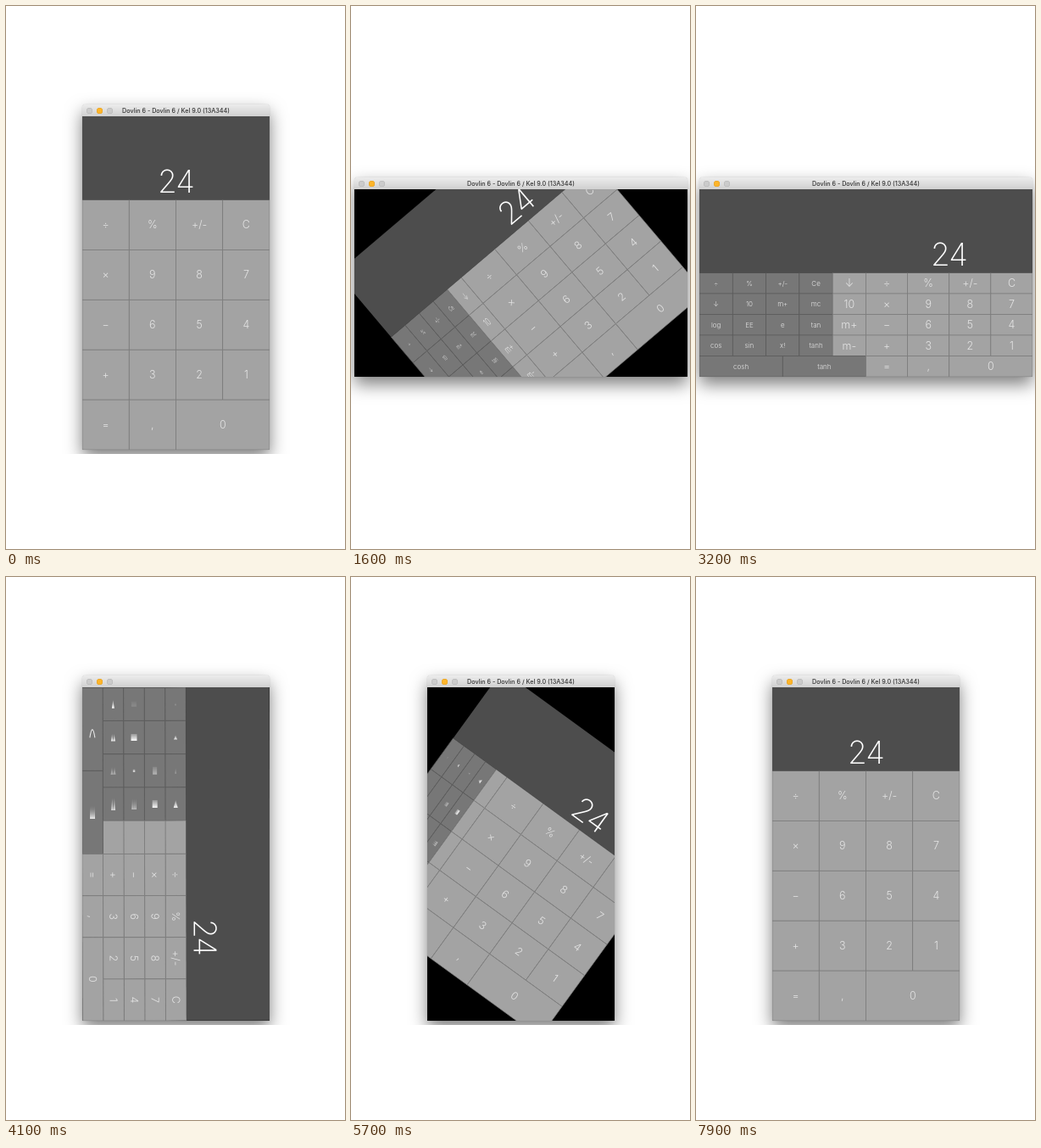
Animation of 400x640 px, one loop 8000 ms. Source, as an HTML page:

```html
<!DOCTYPE html>
<html lang="en">
<head>
<meta charset="utf-8">
<title>Rotating calculator</title>
<style>
/* --p: layout progress, 0 = portrait, 1 = landscape. --d: device orientation. */
@property --p { syntax: "<number>"; inherits: true; initial-value: 0; }
@property --d { syntax: "<number>"; inherits: true; initial-value: 0; }

html, body { margin: 0; width: 100%; height: 100%; overflow: hidden; background: #fff; }

#stage {
  position: absolute; left: 0; top: 0; width: 400px; height: 528px;
  overflow: hidden;
  font-family: Inter, Roboto, "Liberation Sans", sans-serif;
  animation: layout 8s infinite, device 8s step-end infinite;
}
@keyframes layout {
  0%, .125% { --p: 0; animation-timing-function: ease-in-out; }
  37.625% { --p: 1; }
  50.3125% { --p: 1; animation-timing-function: ease-in-out; }
  87.8125%, 100% { --p: 0; }
}
@keyframes device {
  0% { --d: 0; }
  1.1875% { --d: 1; }
  51.1875%, 100% { --d: 0; }
}

#window {
  position: absolute;
  left: calc(90px - 86px * var(--d));
  top: calc(116px + 86px * var(--d));
  width: calc(221px + 172px * var(--d));
  height: calc(407px - 172px * var(--d));
  border-radius: 4px 4px 1px 1px;
  box-shadow: 0 9px 20px rgba(0, 0, 0, .5), 0 0 1px rgba(0, 0, 0, .35);
}
#bar {
  position: relative; height: 14px;
  border-radius: 4px 4px 0 0;
  background: linear-gradient(#ececec, #d0d0d0);
}
#bar i {
  position: absolute; top: 4px; width: 7px; height: 7px;
  border-radius: 50%; background: #cbcbcb;
  box-shadow: inset 0 0 0 .5px #b4b4b4;
}
#bar i:nth-child(1) { left: 5px; }
#bar i:nth-child(2) { left: 16.5px; background: #fdb52a; box-shadow: inset 0 0 0 .5px #e09c20; }
#bar i:nth-child(3) { left: 28.5px; }
#bar span {
  position: absolute; left: 0; right: 0; top: 0;
  font-size: 7.2px; line-height: 15px; font-weight: 500;
  text-align: center; white-space: nowrap; color: #333;
  animation: title 8s step-end infinite;
}
@keyframes title {
  0% { opacity: 1; }
  1.1875% { opacity: 0; }
  2.4% { opacity: 1; }
  51.1875% { opacity: 0; }
  52.4%, 100% { opacity: 1; }
}

#screen {
  position: absolute; left: 0; top: 14px; width: 100%; height: calc(100% - 14px);
  display: block; overflow: hidden; background: #000;
  --w: calc(221px + 172px * var(--p));
  --h: calc(393px - 172px * var(--p));
  --u: calc(39.3px * var(--p));
  --c: calc(55.25px - 6.125px * var(--p));
  --r: calc(58.9px - 34.4px * var(--p));
}
#view {
  transform:
    translate(calc(110.5px + 86px * var(--d)), calc(196.5px - 86px * var(--d)))
    rotate(calc(90deg * (var(--p) - var(--d))))
    translate(calc(var(--w) * -.5), calc(var(--h) * -.5));
}
.display { width: var(--w); height: 98.5px; fill: #4d4d4d; }
.cell { fill: #a3a3a3; stroke: #7c7c7c; stroke-width: .7px; height: var(--r); }
.cell.dark { fill: #777; stroke: #5c5c5c; }
text { text-anchor: middle; font-size: 12.5px; font-weight: 300; fill: #e4e4e4; }
.sci { opacity: var(--d); }
.sci.dark { font-size: 8px; }
.smear { opacity: calc(1 - var(--d)); }
.result {
  font-size: 37px; font-weight: 200; letter-spacing: -1px; fill: #fff;
  transform: translate(calc(110.5px + 184px * var(--p)), 76.5px);
}
</style>
</head>
<body>
<div id="stage">
  <div id="window">
    <div id="bar"><i></i><i></i><i></i><span>Dovlin 6 - Dovlin 6 / Kel 9.0 (13A344)</span></div>
    <svg id="screen">
      <defs>
        <linearGradient id="fade">
          <stop offset="0" stop-color="#fff" stop-opacity=".25"/>
          <stop offset="1" stop-color="#fff"/>
        </linearGradient>
      </defs>
      <g id="view"></g>
    </svg>
  </div>
</div>
<script>
const view = document.getElementById('view');

function add(tag, cls, style, attrs = {}, text = '') {
  const el = document.createElementNS('http://www.w3.org/2000/svg', tag);
  if (cls) el.setAttribute('class', cls);
  el.setAttribute('style', style);
  for (const k in attrs) el.setAttribute(k, attrs[k]);
  el.textContent = text;
  view.append(el);
}

const sciX = c => `calc(var(--u) * ${c})`;
const mainX = c => `calc(var(--u) * 5 + var(--c) * ${c})`;
const rowY = r => `calc(98.5px + var(--r) * ${r})`;
const at = (x, r) => `translate(${x}, ${rowY(r + .5)})`;

function cell(cls, x, unit, span, r) {
  add('rect', 'cell ' + cls, `x:${x};y:${rowY(r)};width:calc(var(${unit}) * ${span})`);
}

function sciKey(label, c, r, span = 1) {
  const tone = c < 4 ? 'dark' : '';
  cell(tone, sciX(c), '--u', span, r);
  add('text', 'sci ' + tone, `transform:${at(sciX(c + span / 2), r)} scaleX(var(--p))`,
    { dy: '.36em' }, label);
}

function mainKey(label, c, r, span = 1) {
  cell('', mainX(c), '--c', span, r);
  add('text', '', `transform:${at(mainX(c + span / 2), r)}`, { dy: '.36em' }, label);
}

// A label squeezed to nothing: n spikes, or a block when n is 0.
function smear(c, r, len, wide, n, alpha) {
  const a = -len / 2, b = len / 2, step = wide / (n || 1);
  let d = '';
  for (let i = 0; i < (n || 1); i++) {
    const y = -wide / 2 + i * step;
    d += n ? `M${b} ${y}L${a} ${y + step / 2}L${b} ${y + step}Z`
           : `M${a} ${y}H${b}V${y + step}H${a}Z`;
  }
  add('path', 'smear', `transform:${at(sciX(c + .5), r)} scaleX(var(--p))`,
    { d, fill: 'url(#fade)', 'fill-opacity': alpha });
}

['÷ % +/- Ce ↓', '↓ 10 m+ mc 10', 'log EE e tan m+', 'cos sin x! tanh m-']
  .forEach((row, r) => row.split(' ').forEach((s, c) => sciKey(s, c, r)));
sciKey('cosh', 0, 4, 2.5);
sciKey('tanh', 2.5, 4, 2.5);

['÷ % +/- C', '× 9 8 7', '− 6 5 4', '+ 3 2 1', '= ,']
  .forEach((row, r) => row.split(' ').forEach((s, c) => mainKey(s, c, r)));
mainKey('0', 2, 4, 2);

[
  [0, 0, 3, 2, 1, .25], [1, 0, 5, 4, 1, .85], [2, 0, 7, 1.5, 1, .35], [3, 0, 9, 5, 1, .9],
  [2, 1, 9, 5, 0, .45], [3, 1, 9, 6, 0, .95],
  [0, 2, 6, 6, 0, .15], [1, 2, 8, 7, 0, 1], [2, 2, 3, 2.5, 0, .95], [3, 2, 13, 6, 3, .5],
  [0, 3, 10, 3, 1, 1], [1, 3, 9, 5, 2, .9], [2, 3, 9, 6, 2, .4], [3, 3, 15, 5, 2, .7],
  [3.25, 4, 15, 6, 3, .85]
].forEach(s => smear(...s));
add('path', 'smear', `transform:${at(sciX(1.25), 4)} scaleX(var(--p))`,
  { d: 'M10 -3Q-9 0 10 3', fill: 'none', stroke: '#e8e8e8', 'stroke-width': 1.1 });

add('rect', 'display', '');
add('text', 'result', '', { dy: '.36em' }, '24');
</script>
</body>
</html>
```
